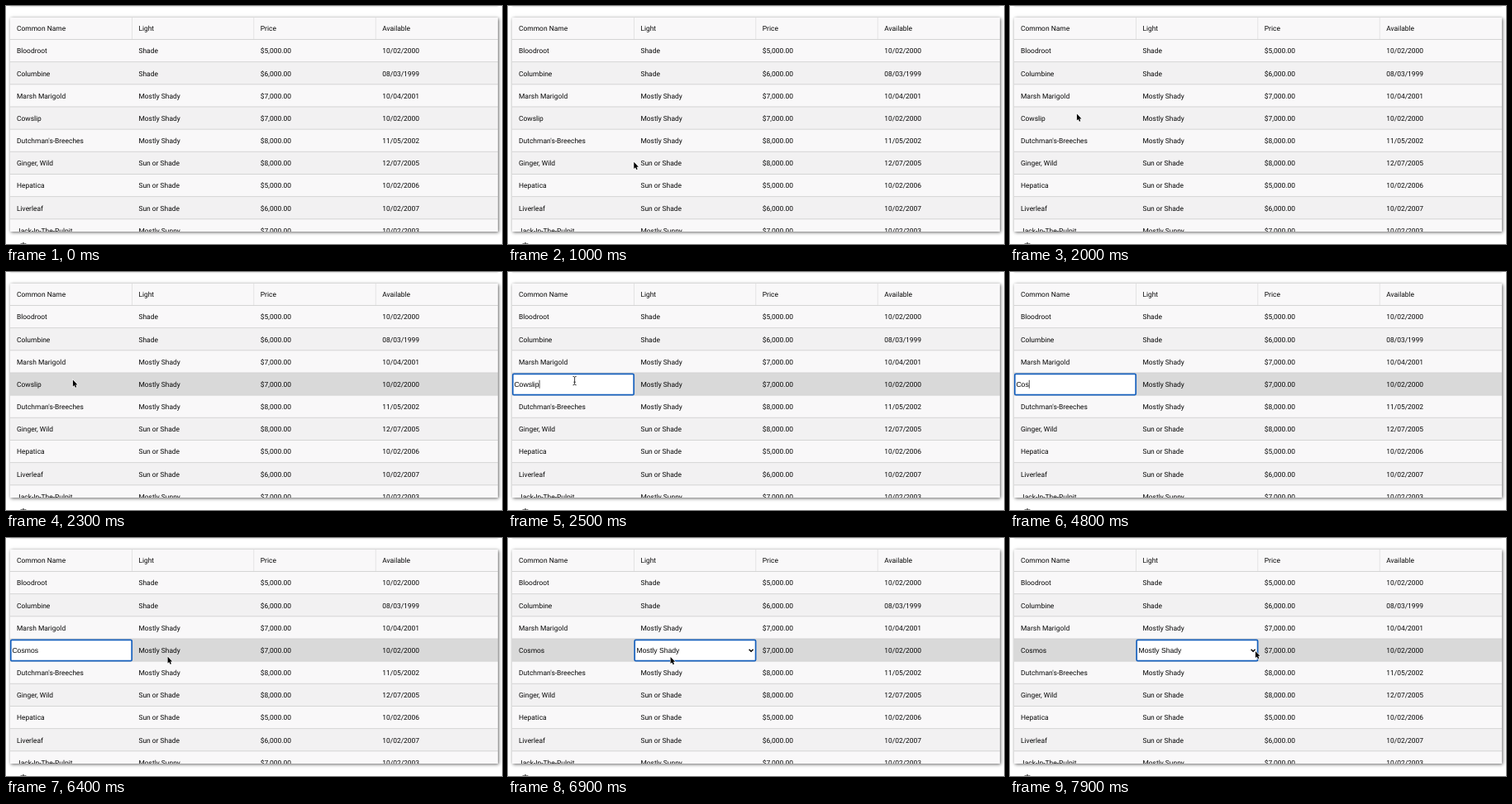
Recreate the animation shown at these times as an HTML page. Size 600 px wide and 288 px high, loop 8 s.

```html
<!DOCTYPE html>
<html lang="en">
<head>
<meta charset="utf-8">
<title>Editable plant grid</title>
<style>
html, body { margin: 0; width: 600px; height: 288px; overflow: hidden; background: #fff; }
.panel { position: absolute; left: 5px; width: 590px; background: #f9f8f9; box-shadow: 1px 1px 4px rgba(0,0,0,.6); }
#above { top: -20px; height: 20px; box-shadow: 0 0 2px rgba(0,0,0,.35); }
#grid { top: 14px; height: 259px; }
svg { position: absolute; left: 0; top: 0; display: block; }
text { font: 8.45px Roboto, sans-serif; fill: #080808; text-rendering: geometricPrecision; white-space: pre; }
.input { font: 8.65px "Liberation Sans", Arial, sans-serif; fill: #000; }
</style>
</head>
<body>
<div class="panel" id="above"></div>
<div class="panel" id="grid"></div>
<svg id="stage" width="600" height="288" viewBox="0 0 600 288"></svg>
<script>
const LOOP = 8000, STEP = 100, ROW = 27.17, TOP = 13.8, LEFT = 5, COL = 147.4, EDIT_ROW = 4;
const stage = document.getElementById('stage');

const rows = [
  ['Common Name', 'Light', 'Price', 'Available'],
  ['Bloodroot', 'Shade', '$5,000.00', '10/02/2000'],
  ['Columbine', 'Shade', '$6,000.00', '08/03/1999'],
  ['Marsh Marigold', 'Mostly Shady', '$7,000.00', '10/04/2001'],
  ['Cowslip', 'Mostly Shady', '$7,000.00', '10/02/2000'],
  ["Dutchman's-Breeches", 'Mostly Shady', '$8,000.00', '11/05/2002'],
  ['Ginger, Wild', 'Sun or Shade', '$8,000.00', '12/07/2005'],
  ['Hepatica', 'Sun or Shade', '$5,000.00', '10/02/2006'],
  ['Liverleaf', 'Sun or Shade', '$6,000.00', '10/02/2007'],
  ['Jack-In-The-Pulpit', 'Mostly Sunny', '$7,000.00', '10/02/2003']
];

function add(parent, tag, attrs, text) {
  const el = document.createElementNS('http://www.w3.org/2000/svg', tag);
  for (const k in attrs) el.setAttribute(k, attrs[k]);
  if (text !== undefined) el.textContent = text;
  return parent.appendChild(el);
}
const rect = (p, x, y, width, height, fill, more) =>
  add(p, 'rect', { x, y, width, height, fill, ...more });
const show = (el, on) => el.setAttribute('visibility', on ? 'inherit' : 'hidden');
const place = (el, x, y) => el.setAttribute('transform', `translate(${x} ${y})`);

const clip = add(stage, 'clipPath', { id: 'view' });
rect(clip, LEFT, 14, 590, 259);
const table = add(stage, 'g', { 'clip-path': 'url(#view)' });

let editFill, nameCell;
rows.forEach((cells, r) => {
  const y = TOP + r * ROW;
  const fill = rect(table, LEFT, y, 590, ROW, r && r % 2 === 0 ? '#f2f1f2' : '#f9f8f9');
  rect(table, LEFT, y + ROW - 1, 590, 1.5, '#d4d4d4');
  if (r === EDIT_ROW) editFill = fill;
  cells.forEach((s, c) => {
    const label = add(table, 'text', { x: LEFT + c * COL + 8, y: y + 16.5 }, s);
    if (r === EDIT_ROW && c === 0) nameCell = label;
    if (!r && c) rect(table, LEFT + c * COL - .4, TOP, .8, ROW - 1, '#dedede');
  });
});

// top of a gear peeking in below the grid
const gear = add(stage, 'g', { fill: '#666' });
add(gear, 'circle', { cx: 21, cy: 290.6, r: 3.4 });
for (const a of [-45, 0, 45])
  rect(gear, 19.9, 286, 2.2, 2.6, '#666', { rx: .9, transform: `rotate(${a} 21 290.6)` });

function editor(col) {
  const g = add(stage, 'g', {});
  rect(g, LEFT + col * COL + .8, 123.3, 146.4, 25.4, '#fff',
    { rx: 1.4, stroke: '#1660bd', 'stroke-width': 1.7 });
  return g;
}
const nameBox = editor(0);
const selection = rect(nameBox, 7.5, 130.6, 31, 10.4, '#b3d7ff');
const typed = add(nameBox, 'text', { class: 'input', x: 7.4, y: 139.1 });
const caret = rect(nameBox, 0, 130.8, .7, 10, '#000');

const lightBox = editor(1);
add(lightBox, 'text', { class: 'input', x: 155.6, y: 139.1 }, 'Mostly Shady');
add(lightBox, 'path', { d: 'M291.6 134.7l2.5 2.6 2.5-2.6', fill: 'none', stroke: '#000', 'stroke-width': 1.4 });

const arrow = add(stage, 'path', {
  d: 'M.3 .5V8.6L2.1 7 3.3 9.8 4.7 9.2 3.5 6.4H5.9Z',
  fill: '#000', stroke: '#fff', 'stroke-width': 1.2, 'paint-order': 'stroke'
});
const beam = add(stage, 'path', {
  d: 'M-2.1-5.2Q0-5.2 0-4V4Q0 5.2 2.1 5.2M2.1-5.2Q0-5.2 0-4M0 4Q0 5.2-2.1 5.2M-1.2 1.6H1.2',
  fill: 'none', stroke: '#222', 'stroke-width': .9
});

// pointer path: time, x, y
const path = [
  [500, 452, 265.5], [700, 452, 265.5], [1000, 152, 188.3], [1100, 152, 188.3],
  [1400, 86, 130], [1800, 86, 130], [2000, 80.6, 130], [5800, 80.6, 131.5],
  [6400, 195.3, 143], [6500, 196.3, 143.4], [7000, 196.3, 143.4], [7900, 296.6, 136.4]
];
function pointer(t) {
  const i = path.findIndex(p => p[0] > t);
  if (i < 0) return path[path.length - 1].slice(1);
  if (i === 0) return [0, 0];
  const [t0, x0, y0] = path[i - 1], [t1, x1, y1] = path[i];
  const u = (t - t0) / (t1 - t0), e = u * u * (3 - 2 * u);
  return [x0 + (x1 - x0) * e, y0 + (y1 - y0) * e];
}

const keys = [4400, 4600, 4800, 4900, 5000, 5100];
const within = (t, ...spans) => spans.some(([a, b]) => t >= a && t < b);

function draw(ms) {
  const t = Math.floor(ms / STEP) * STEP;
  const editing = within(t, [2500, 6500]);
  const value = t < 4400 ? 'Cowslip' : 'Cosmos'.slice(0, keys.filter(k => k <= t).length);

  editFill.setAttribute('fill', t >= 2300 ? '#d9d9d9' : '#f2f1f2');
  nameCell.textContent = t < 6500 ? 'Cowslip' : 'Cosmos';
  show(nameCell, !editing);
  show(nameBox, editing);
  show(lightBox, t >= 6900);

  if (typed.textContent !== value) typed.textContent = value;
  caret.setAttribute('x', 7.5 + typed.getComputedTextLength());
  show(caret, editing && within(t, [2500, 2800], [3200, 3700], [4400, 5400], [5900, 6400]));
  show(selection, editing && within(t, [3700, 4400]));

  const [x, y] = pointer(t);
  const inText = editing && x < 152;
  const visible = t >= 500 && !within(t, [4400, 5900]);
  show(arrow, visible && !inText);
  show(beam, visible && inText);
  place(arrow, x, y);
  place(beam, x, t < 5800 ? 131.6 : y);
}

const start = performance.now();
function tick() {
  draw((performance.now() - start) % LOOP);
  requestAnimationFrame(tick);
}
draw(0);
tick();
</script>
</body>
</html>
```
